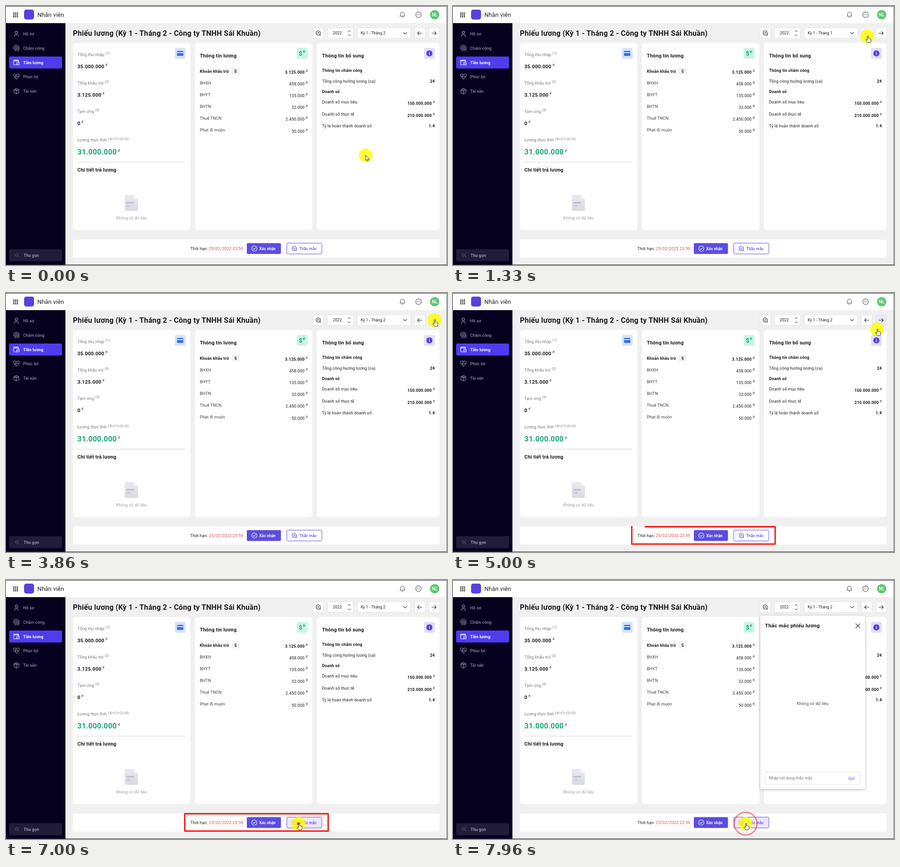
These frames come from a looping animation (976x574 px, 8000 ms). An HTML page:

```html
<!DOCTYPE html>
<html lang="vi">
<head>
<meta charset="utf-8">
<title>Phiếu lương</title>
<style>
html, body { margin: 0; width: 100%; height: 100%; overflow: hidden; background: #f0f0f0; }
svg { display: block; width: 976px; height: 574px; font-family: Roboto, "Noto Sans", sans-serif; }
.line { fill: none; stroke-linecap: round; stroke-linejoin: round; }
</style>
</head>
<body>
<svg id="stage" viewBox="0 0 976 574"></svg>
<script>
const INK = '#1b1b1f', GREY = '#74767d', VIOLET = '#5a4de0', LOOP = 8000;

// ---------- markup helpers ----------
const text = (x, y, str, o = {}) => {
  const { size = 9.1, weight = 400, fill = INK, anchor = 'start', ls = 0.15, extra = '' } = o;
  return `<text x="${x}" y="${y}" font-size="${size}" font-weight="${weight}" fill="${fill}"
    text-anchor="${anchor}" letter-spacing="${ls}" ${extra}>${str}</text>`;
};
const bold = (x, y, str, o = {}) => text(x, y, str, { weight: 600, ...o });
const head = (x, y, str) => bold(x, y, str, { size: 11, ls: 0.2 });
const sup = (str, dy = -3.6, size = 7.2) =>
  `<tspan dx="2.5" dy="${dy}" font-size="${size}" font-weight="400">${str}</tspan>`;
const dong = (dy = -4) => sup('đ', dy, 6.8);
const money = (x, y, str, weight = 400) => text(x, y, str + dong(), { weight, anchor: 'end' });
const rect = (x, y, w, h, fill, r = 0, extra = '') =>
  `<rect x="${x}" y="${y}" width="${w}" height="${h}" rx="${r}" fill="${fill}" ${extra}/>`;
const line = (d, stroke, w = 1, extra = '') =>
  `<path class="line" d="${d}" stroke="${stroke}" stroke-width="${w}" ${extra}/>`;
const circle = (x, y, r, fill, extra = '') => `<circle cx="${x}" cy="${y}" r="${r}" fill="${fill}" ${extra}/>`;
const group = (id, body, extra = '') => `<g id="${id}" ${extra}>${body}</g>`;
const box = (x, y, w, h, id = '') =>
  rect(x + .5, y + .5, w - 1, h - 1, '#fff', 2.5, `stroke="#e2e3e6" ${id && `id="${id}"`}`);
const chat = (x, y, c) =>
  line(`M${x + 4.9} ${y + 4.9}L${x + 2.4} ${y + 4.2}A4.8 4.8 0 1 1 ${x + 4.2} ${y + 2.4}Z`, c, 1.2) +
  line(`M${x - 2} ${y - 1}h4M${x - 2} ${y + 1.2}h4`, c, 1);

// ---------- fixed chrome ----------
function topBar() {
  let s = rect(0, 0, 976, 38, '#fff');
  for (let i = 0; i < 9; i++) s += rect(16 + (i % 3) * 4, 14.5 + (i / 3 | 0) * 4, 2.6, 2.6, '#17171c', .4);
  s += rect(40, 8, 22, 22, '#5b3fdc', 5);
  s += text(69.5, 23.7, 'Nhân viên', { size: 13, ls: .2 });
  s += line('M872 22.5C873.6 21 873.3 19.5 873.3 17.5A4 4 0 0 1 881.3 17.5C881.3 19.5 881 21 882.6 22.5ZM875.7 24.2A1.7 1.7 0 0 0 879 24.2', '#55565c', 1.1);
  s += circle(913, 19.3, 6.2, 'none', 'stroke="#55565c" stroke-width="1.1"');
  for (const dx of [-2.8, 0, 2.8]) s += circle(913 + dx, 19.3, .9, '#55565c');
  return s + circle(948.7, 19.3, 10.4, '#5cc873') +
    bold(948.8, 22.9, 'NL', { size: 10, fill: '#fff', anchor: 'middle', ls: .1, weight: 500 });
}

function sideBar() {
  const c = '#918ea4', items = ['Hồ sơ', 'Chấm công', 'Tiền lương', 'Phúc lợi', 'Tài sản'];
  let s = rect(0, 38, 131.5, 536, '#070120') + rect(7, 112, 117, 26.5, '#4f3cf0', 3) +
    rect(7, 539, 117, 26.5, '#211c39', 3);
  items.forEach((label, i) => s += bold(38, 65 + i * 31.8, label, { fill: i === 2 ? '#fff' : c, weight: i === 2 ? 700 : 500, ls: .1 }));
  s += circle(23, 58.4, 2.8, 'none', `stroke="${c}" stroke-width="1.2"`) + line('M18.5 67.5Q18.5 63.3 23 63.3T27.5 67.5', c, 1.2);
  s += line('M17 95.5A6.3 6.3 0 1 1 29 94V98M19.3 99V93.3A3.8 3.8 0 0 1 26.8 93.3V100M21.7 100V93.8A1.4 1.4 0 0 1 24.4 93.8V99', c, 1.1);
  s += line('M27 121.5V119.8H18.5Q17 119.8 17 121.3V129Q17 130.5 18.5 130.5H23M17.3 121.6H28V124M24 125H29V130.5H24Z', '#fff', 1.2) + circle(26.5, 127.8, .8, '#fff');
  s += line('M17 155Q15.5 151 19 150.5L23 152 27 150.5Q31 151.5 29 155.5L23.5 162.5 17 155.5M23 152L20 155.5Q22 157.5 24.5 154.5L28 158M21 160L23 158M19 158L21 156.2', c, 1.1);
  s += line('M23 182.8L28.5 185.6V192L23 195L17.5 192V185.6ZM17.5 185.6L23 188.6L28.5 185.6M23 188.6V195M20 184.2L25.8 187.2', c, 1.1);
  s += line('M24 548L20 552L24 556M28.5 548L24.5 552L28.5 556', '#77738c', 1);
  return s + bold(39, 555.5, 'Thu gọn', { fill: '#b3b0c2', ls: .12, weight: 500 });
}

function toolBar() {
  let s = `<text id="title" x="148" y="66" font-size="16.2" font-weight="600" letter-spacing=".24" fill="${INK}"></text>`;
  s += box(679, 48, 24, 24) + chat(691, 59.7, '#34353a');
  s += box(711, 48, 58, 24) + text(723.5, 63.3, '2022', { size: 8.5, ls: .1 }) +
    line('M757 57L759.7 54L762.4 57M757 63.5L759.7 66.5L762.4 63.5', '#55565c', 1.1);
  s += box(777, 48, 119, 24) + `<text id="period" x="785" y="63" font-size="8.5" letter-spacing=".1" fill="${INK}"></text>` +
    line('M880 58.5L883.3 61.8L886.6 58.5', '#34353a', 1.2);
  s += box(904, 48, 24, 24, 'prev') + line('M920.5 60.3H911M914.5 56.5L910.8 60.3L914.5 64', '#2b2c31', 1.1, 'id="prevArrow"');
  return s + box(936, 48, 24, 24, 'next') + line('M942.5 60.3H952M948.6 56.5L952.3 60.3L948.6 64', '#2b2c31', 1.1);
}

// ---------- the two payslips ----------
function cardIcons(a, b, c) {
  let s = rect(a, 93, 24, 24, '#d5e3fb', 4) + rect(a + 5, 99.5, 14, 11, '#2d6be4', 1.5) + rect(a + 5, 102.2, 14, 2.2, '#dce8fc');
  s += rect(b, 93, 24, 24, '#c9f4e6', 4) + bold(b + 4.5, 109.5, '$', { size: 13.5, fill: '#10a878' }) +
    line(`M${b + 16} 98.6v5M${b + 13.5} 101.1h5`, '#10a878', 1.4);
  return s + rect(c, 93, 24, 24, '#e2ddfb', 4) + circle(c + 12, 105, 6.8, '#5442d6') +
    rect(c + 11.4, 103.7, 1.3, 4.6, '#fff') + rect(c + 11.4, 101.3, 1.3, 1.4, '#fff');
}

function summary(values, right) {
  const labels = ['Tổng thu nhập', 'Tổng khấu trừ', 'Tạm ứng', 'Lương thực lĩnh'];
  let s = '';
  labels.forEach((label, i) => {
    const y = 110.5 + i * 63.2, last = i === 3;
    s += text(158, y, label + sup(last ? '(4)=(1)-(2)-(3)' : `(${i + 1})`), { fill: GREY });
    s += last
      ? bold(158, 328.8, values[i] + `<tspan fill="${INK}">${dong(-6)}</tspan>`, { size: 16, fill: '#17a574', ls: .45 })
      : bold(158, y + 27, values[i] + dong(-4.8), { size: 11, ls: .28 });
  });
  return s + rect(158, 345.5, right - 158, 1, '#d6d6d8') + head(158, 366.5, 'Chi tiết trả lương');
}

// A row with a third item is a bold heading carrying a count badge.
const salaryRows = (x, right, rows) => rows.map(([label, value, count], i) => {
  const y = 147.6 + i * 26.15, weight = count ? 600 : 400;
  return text(x, y, label, { weight, fill: count ? INK : '#3a3b40' }) +
    money(right, y + 2.2, value, weight) +
    (count ? rect(x + 70, y - 11, 18.5, 15, '#f1f1f2', 2) + bold(x + 79.3, y, count, { anchor: 'middle' }) : '');
}).join('');

function february() {
  let s = rect(148, 82, 260, 414.5, '#fff', 6) + rect(418, 82, 260, 414.5, '#fff', 6) + rect(688, 82, 271.5, 414.5, '#fff', 6);
  s += cardIcons(373.5, 643.5, 925) + summary(['35.000.000', '3.125.000', '0', '31.000.000'], 397);
  s += `<path d="M266 418.5H282.5L292 428V451Q292 454 289 454H266Q263 454 263 451V421.5Q263 418.5 266 418.5Z" fill="url(#paper)"/>
    <path d="M282.5 418.5L292 428H285Q282.5 428 282.5 425.5Z" fill="#f4f4f8"/>` +
    rect(266.5, 434.5, 16.5, 3, '#b9bac8') + rect(266.5, 441.5, 9.5, 3, '#c4c5d1');
  s += text(277.7, 473, 'Không có dữ liệu', { fill: '#9a9ca3', anchor: 'middle', ls: .1, extra: 'font-style="italic"' });
  s += head(429, 113.5, 'Thông tin lương') + salaryRows(429, 667.5, [
    ['Khoản khấu trừ', '3.125.000', 5], ['BHXH', '458.000'], ['BHYT', '135.000'],
    ['BHTN', '32.000'], ['Thuế TNCN', '2.450.000'], ['Phạt đi muộn', '50.000']]);
  s += head(699.5, 113.5, 'Thông tin bổ sung') + bold(699.5, 146.3, 'Thông tin chấm công') +
    text(699.5, 170.2, 'Tổng công hưởng lương (ca)') + bold(949, 170.2, '24', { anchor: 'end' }) +
    bold(699.5, 193.2, 'Doanh số', { ls: .1 });
  s += text(699.5, 216.3, 'Doanh số mục tiêu') + money(949, 219.3, '150.000.000', 600);
  s += text(699.5, 242.5, 'Doanh số thực tế') + money(949, 245.5, '210.000.000', 600);
  s += text(699.5, 268.5, 'Tỷ lệ hoàn thành doanh số') + bold(949, 268.5, '1.4', { anchor: 'end' });
  // footer with the two actions
  s += rect(148, 517.5, 811.5, 40, '#fff', 2) + text(408, 541, 'Thời hạn:') +
    text(449, 541, '25/02/2022 23:59', { fill: '#e5484d', ls: .17 });
  s += rect(533, 525.5, 75.5, 24, VIOLET, 2.5, 'id="confirm"') + circle(549.5, 537.5, 5.7, 'none', 'stroke="#fff" stroke-width="1.1"') +
    line('M547 537.6L548.9 539.5L552.2 535.8', '#fff', 1.1) +
    bold(560.5, 540.9, 'Xác nhận', { size: 8.5, fill: '#fff', weight: 700, ls: .1 });
  return s + rect(621.5, 525.5, 77.5, 24, '#fff', 2.5, `id="ask" stroke="${VIOLET}"`) + chat(638, 537.2, VIOLET) +
    bold(649, 540.9, 'Thắc mắc', { size: 8.5, fill: VIOLET, weight: 500 });
}

function january() {
  let s = [[148, 258], [416.5, 258.5], [685, 269]].map(([x, w]) =>
    `<path d="M${x} 507V88Q${x} 82 ${x + 6} 82H${x + w - 6}Q${x + w} 82 ${x + w} 88V507Z" fill="#fff"/>`).join('');
  s += rect(954, 82, 5.5, 388, '#989898', 2.7);
  s += cardIcons(371.5, 640, 919.5) + summary(['25.000.000', '50.000', '4.000.000', '20.500.000'], 395);
  [['Số phải trả đợt này', '20.500.000', 402.8], ['Số được trả đợt này', '20.500.000', 428.9],
   ['Số còn nợ đợt này', '0', 455.2], ['Trả nợ lương', '0', 491.8]].forEach(([label, value, y], i) =>
    s += text(158, y, label + sup(`(${i + 1})`), { fill: '#3a3b40' }) + money(395.5, y, value, 600));
  s += text(158, 470.2, '(3)=(1) - (2)', { size: 7.2, fill: GREY });
  s += head(427, 113.5, 'Thông tin lương') + salaryRows(427, 664.5, [
    ['Khoản thu nhập', '25.000.000', 1], ['Lương KPI', '2.000.000'], ['Khoản khấu trừ', '50.000', 4],
    ['BHXH', '458.000'], ['BHYT', '135.000'], ['BHTN', '32.000'], ['Thuế TNCN', '1.500.000']]);
  s += head(696, 113.5, 'Thông tin bổ sung') + bold(696, 146.3, 'Thông tin chấm công') +
    text(696, 170.2, 'Tổng công hưởng lương (công chuẩn cố định)') + bold(943.5, 170.2, '22', { anchor: 'end' });
  return s + rect(148, 517.5, 811.5, 40, '#fff', 2) + bold(553.5, 541,
    'Hết thời hạn xác nhận, thông tin trên phiếu lương này đã được nhân sự làm căn cứ để chi trả lương', { anchor: 'middle' });
}

const dialog = () => rect(680, 79, 232, 384, '#fff', 2, 'filter="url(#shadow)"') +
  bold(690.5, 105.2, 'Thắc mắc phiếu lương', { size: 11.7, ls: .22 }) +
  line('M891.5 97L900.5 106M900.5 97L891.5 106', '#34353a', 1.2) +
  text(795.8, 276.5, 'Không có dữ liệu', { anchor: 'middle', fill: '#44454a' }) +
  rect(690.5, 425.5, 210, 28, '#fff', 2, 'stroke="#e2e3e6"') +
  text(699, 442.3, 'Nhập nội dung thắc mắc', { size: 8.6, fill: '#6f7178' }) +
  text(875, 442.5, 'Gửi', { fill: VIOLET });

const pointer = () => circle(0, 0, 15.3, '#ffff00', 'opacity=".8"') +
  circle(0, 0, 1, 'none', 'id="ring" stroke="#f02020"') +
  '<path id="arrow" d="M0 0V11.5L2.7 9L4.4 12.8L6.2 12L4.5 8.3H8Z" fill="#fff" stroke="#111" stroke-width=".9"/>' +
  '<path id="hand" d="M0 .8Q0-.8 1-.8T2.2.8V4.6Q4 4 4.6 5.1Q6 4.5 6.5 5.8Q7.8 5.5 7.8 7V10Q7.8 12 6.8 13.8H.6Q-1.6 10.8-3.2 8.5Q-3.6 7-2.2 7.1L0 8.8Z" fill="#fff" stroke="#111" stroke-width=".9" stroke-linejoin="round"/>';

document.getElementById('stage').innerHTML = `
  <defs>
    <linearGradient id="paper" x1="0" y1="0" x2="0" y2="1"><stop stop-color="#e9e9f0"/><stop offset="1" stop-color="#d9d9e3"/></linearGradient>
    <filter id="shadow" x="-10%" y="-10%" width="120%" height="120%"><feDropShadow dx="0" dy="1.5" stdDeviation="3" flood-opacity=".28"/></filter>
  </defs>` +
  rect(0, 0, 976, 574, '#f0f0f1') + topBar() + sideBar() + toolBar() +
  group('feb', february()) + group('jan', january()) + group('dialog', dialog()) +
  '<path id="mark" d="M395.7 516.5V556.3H713V518H394.2" fill="none" stroke="#f00" stroke-width="2.8" pathLength="1"/>' +
  group('pointer', pointer()) +
  rect(0, 0, 976, 1, '#26262a') + rect(0, 573, 976, 1, '#26262a') + rect(975, 0, 1, 574, '#77777b');

// ---------- motion ----------
const el = {};
document.querySelectorAll('[id]').forEach(n => el[n.id] = n);
const ramp = (t, a, b) => Math.min(1, Math.max(0, (t - a) / (b - a)));
const ease = (t, a, b) => { const u = ramp(t, a, b); return u * u * (3 - 2 * u); };
const pulse = (t, on, off) => ramp(t, on, on + 100) - ramp(t, off, off + 100);
const set = (n, o) => { for (const k in o) n.setAttribute(k, o[k]); };
const show = (n, on) => n.setAttribute('visibility', on ? 'visible' : 'hidden');
const mix = (a, b, u) => `rgb(${a.map((v, i) => Math.round(v + (b[i] - v) * u))})`;
const WHITE = [255, 255, 255], HOVER = [232, 235, 240];

const moves = [ // start, end, from, bend, to
  [100, 900, [796, 331], [856.5, 199], [917, 67]],
  [2430, 2800, [917, 67], [932.5, 63.5], [948, 60]],
  [4854, 5766, [948, 60], [890, 200], [558, 540]],
  [6630, 6930, [558, 540], [602.5, 540], [647.5, 540]],
];
function pointerAt(t) {
  const [a, b, p, q, r] = moves.filter(m => m[0] <= t).pop() || moves[0];
  const u = ease(t, a, b), v = 1 - u;
  return [0, 1].map(i => v * v * p[i] + 2 * u * v * q[i] + u * u * r[i]);
}

function draw(t) {
  const jan = t >= 1530 && t < 3800, periodJan = t >= 1230 && t < 3430;
  show(el.feb, !jan);
  show(el.jan, jan);
  el.title.textContent = `Phiếu lương (Kỳ 1 - Tháng ${jan ? 1 : 2} - Công ty TNHH Sái Khuần)`;
  el.period.textContent = `Kỳ 1 - Tháng ${periodJan ? 1 : 2}`;

  const off = pulse(t, 1230, 3430);
  set(el.prev, { fill: off ? mix(WHITE, [246, 246, 247], off) : mix(WHITE, HOVER, pulse(t, 930, 1230)), stroke: mix([226, 227, 230], [240, 240, 241], off) });
  set(el.prevArrow, { stroke: mix([43, 44, 49], [196, 197, 201], off) });
  set(el.next, { fill: mix(WHITE, HOVER, pulse(t, 2700, 5060)) });
  set(el.confirm, { fill: mix([90, 77, 224], [74, 61, 204], pulse(t, 5830, 6750)) });
  set(el.ask, { fill: mix(WHITE, [233, 230, 252], ramp(t, 6800, 6900)) });

  const drawn = ease(t, 4300, 5100);
  show(el.mark, drawn > 0);
  set(el.mark, { 'stroke-dasharray': drawn < 1 ? `${drawn} 2` : 'none', opacity: 1 - ramp(t, 7460, 7860) });

  const pop = ramp(t, 7380, 7560);
  show(el.dialog, pop > 0);
  set(el.dialog, { opacity: pop });

  const [x, y] = pointerAt(t), hand = (t >= 930 && t < 5040) || t >= 5800;
  set(el.pointer, { transform: `translate(${x.toFixed(2)} ${y.toFixed(2)})` });
  show(el.hand, hand);
  show(el.arrow, !hand);
  const u = ramp(t, 6930, 7960);
  show(el.ring, u > 0);
  set(el.ring, { r: 25.3 * u, 'stroke-width': 3, opacity: 1 - .5 * u });
}

function tick() {
  draw(performance.now() % LOOP);
  requestAnimationFrame(tick);
}
tick();
</script>
</body>
</html>
```
